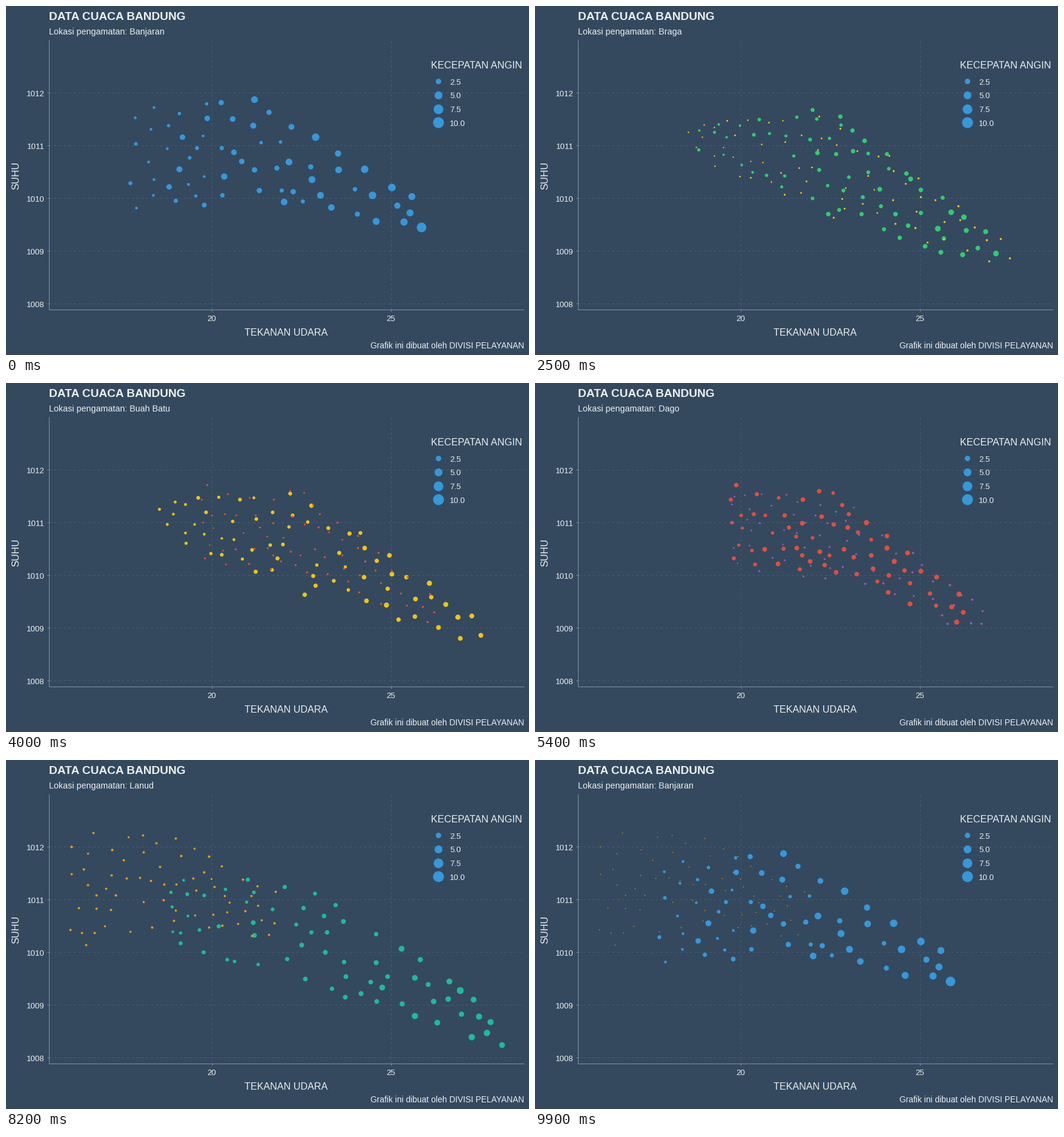
These frames come from a looping animation (864 px wide and 576 px high, 10 s). A matplotlib script:

```python
import numpy as np
import matplotlib.pyplot as plt
from matplotlib.animation import FuncAnimation

plt.rcParams["font.family"] = "Liberation Sans"

W, H = 864, 576
FRAMES, INTERVAL, STEPS = 100, 100, 7
STARTS = [8, 23, 38, 52, 66, 80, 94]
BG, INK, GRID, AXIS = "#34495e", "#ecf0f1", "#465c74", "#8193a2"
MIN_D, COUNT, KNEE = 1.5, 64, 0.45


def cloud(seed, xs, top, bottom, sizes, noise):
    """Evenly spread readings between two bent edges; diameter grows with x."""
    rng = np.random.default_rng(seed)
    knots = [0, KNEE, 1]
    pts, us = [], []
    for _ in range(COUNT):
        u, v = rng.random((2, 6))
        u = u**1.25
        lo, hi = np.interp(u, knots, top), np.interp(u, knots, bottom)
        cand = np.column_stack([np.interp(u, [0, 1], xs), lo + (hi - lo) * v])
        # keep the candidate farthest from the readings so far
        gaps = [min((np.hypot(*(c - p)) for p in pts), default=0) for c in cand]
        best = int(np.argmax(gaps))
        pts.append(cand[best])
        us.append(u[best])
    d = np.interp(us, [0, 1], sizes) + rng.normal(0, noise, COUNT)
    return np.round(pts) + 0.5, np.clip(d, 4.5, 17)


STATIONS = [
    ("Banjaran", "#3498db", cloud(
        4, (205, 691), (168, 152, 326), (340, 320, 376), (5.5, 12), 2)),
    ("Braga", "#2ecc71", cloud(
        11, (264, 767), (195, 165, 380), (240, 350, 437), (5.5, 11), 0.8)),
    ("Buah Batu", "#f1c40f", cloud(
        23, (249, 791), (195, 168, 398), (250, 350, 444), (5.5, 11), 0.8)),
    ("Dago", "#e74c3c", cloud(
        31, (319, 710), (165, 180, 355), (305, 315, 402), (8, 10), 0.8)),
    ("ITB", "#9b59b6", cloud(
        42, (321, 740), (180, 188, 370), (310, 325, 421), (7, 11), 0.8)),
    ("Lanud", "#1abc9c", cloud(
        57, (268, 820), (185, 205, 430), (300, 380, 482), (6, 13), 1)),
    ("Lembang", "#f39c12", cloud(
        66, (106, 447), (120, 118, 215), (312, 272, 296), (11.5, 11), 1)),
]


def ease(t):
    return 16 * t**5 if t < 0.5 else 1 - 16 * (1 - t)**5


fig = plt.figure(figsize=(W / 72, H / 72), dpi=72, facecolor=BG)
ax = fig.add_axes([0, 0, 1, 1])
ax.set_xlim(0, W)
ax.set_ylim(H, 0)
ax.axis("off")


def label(x, y, text, size, **kw):
    return ax.text(x, y, text, size=size, color=INK, va="baseline", **kw)


def line(x0, y0, x1, y1, color=AXIS, **kw):
    ax.plot([x0, x1], [y0, y1], color=color, lw=1,
            solid_capstyle="butt", **kw)


def dots(pts, d, color, z):
    pts = np.asarray(pts, float)
    return ax.scatter(pts[:, 0], pts[:, 1], s=np.square(d), c=color,
                      linewidths=0, zorder=z)


for i in range(5):
    y = 143 + 87 * i
    line(71, y, 856, y, GRID, dashes=(4, 4))
    line(68, y, 71, y)
    label(64, y + 6, str(1012 - i), 13.3, ha="right")
for x, text in ((340, "20"), (636, "25")):
    line(x, 501, x, 56, GRID, dashes=(4, 4))
    line(x, 501, x, 504)
    label(x, 520, text, 13.3, ha="center")
line(71, 56, 71, 501)
line(71, 501, 856, 501)

label(71, 23, "DATA CUACA BANDUNG", 19.1, weight="bold")
subtitle = label(71, 47, "", 14.2)
label(462.5, 544, "TEKANAN UDARA", 16.1, ha="center")
label(21, 279.5, "SUHU", 16.3, rotation=90, ha="center",
      rotation_mode="anchor")
label(856, 565, "Grafik ini dibuat oleh DIVISI PELAYANAN", 13.8, ha="right")

label(702, 103, "KECEPATAN ANGIN", 16.3)
for i, (text, d) in enumerate(zip(("2.5", "5.0", "7.5", "10.0"),
                                  (9, 13, 16, 18))):
    y = 124 + 22.8 * i
    dots([(714.3, y)], d, "#3498db", 20)
    label(733, y + 5.5, text, 13.2)

layers = [dots(pts, d, color, 5 + i)
          for i, (_, color, (pts, d)) in enumerate(STATIONS)]


def draw(frame):
    n = len(STATIONS)
    # before the first transition, the last one counts as complete
    cur = sum(frame >= s for s in STARTS) - 1
    t = 1 if cur < 0 else min(1, (frame - STARTS[cur] + 1) / STEPS)
    old, new = cur % n, (cur + 1) % n
    e = ease(t)
    for i, (layer, (_, _, (_, d))) in enumerate(zip(layers, STATIONS)):
        grow = e if i == new else 1 - e if i == old else 0
        layer.set_visible(grow > 0)
        layer.set_sizes((MIN_D + (d - MIN_D) * grow)**2)
    name = STATIONS[new if t > 0.5 else old][0]
    subtitle.set_text("Lokasi pengamatan: " + name)
    return layers + [subtitle]


anim = FuncAnimation(fig, draw, frames=FRAMES, interval=INTERVAL,
                     repeat=True, repeat_delay=0)
plt.show()
```
